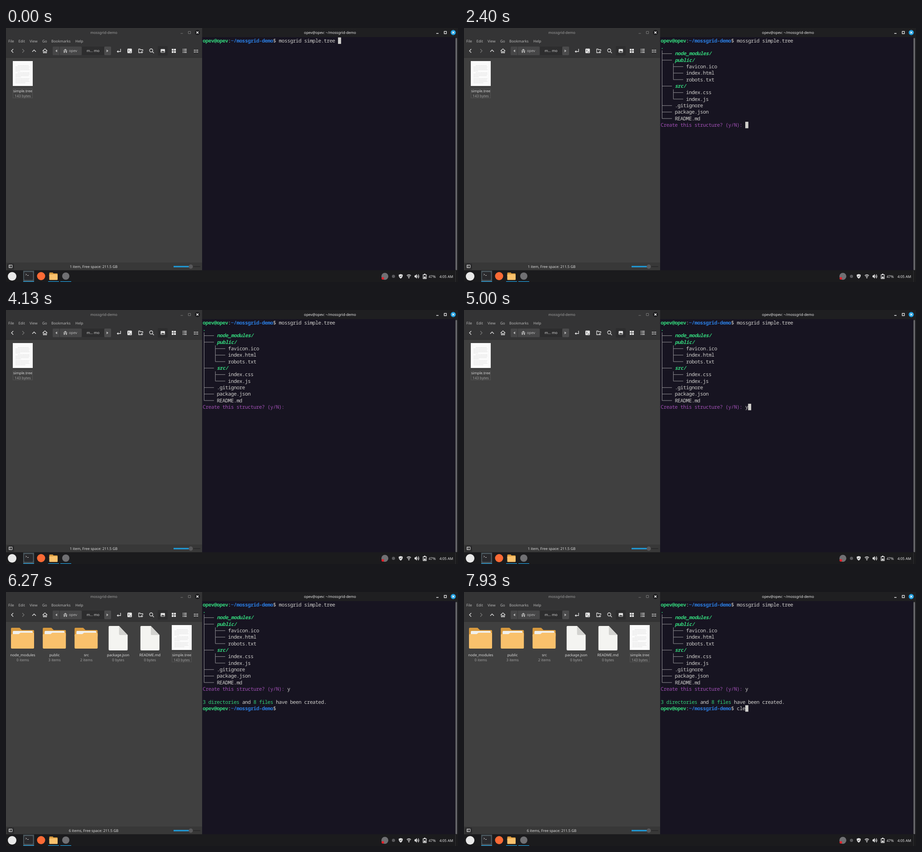
An HTML page that plays this animation: 998x561 px, repeating every 8000 ms.

```html
<!DOCTYPE html>
<html lang="en">
<head>
<meta charset="utf-8">
<title>Directory tree demo</title>
<style>
  html, body { margin: 0; width: 100%; height: 100%; overflow: hidden; background: #1b1b1d; }
  svg { display: block; width: 998px; height: 561px; }
  text { font: 8px "Noto Sans", "Open Sans", sans-serif; fill: #dcdcdc; text-rendering: geometricPrecision; }
  .mid { text-anchor: middle; }
  .dim { fill: #a0a0a0; }
  .soft { fill: #b8b8b8; }
  .strong { font-weight: 500; fill: #ececec; }
  /* 11.2px glyphs set on the terminal's 6.22px cell grid */
  #term text { font: 11.2px "Noto Sans Mono", "DejaVu Sans Mono", monospace; letter-spacing: -.498px; fill: #d0cfcc; white-space: pre; }
  #term .user { font-weight: 700; fill: #33d17a; }
  #term .path { font-weight: 700; fill: #2a7bde; }
  #term .dir { font-weight: 700; font-style: italic; fill: #33d17a; }
  #term .ok { fill: #33d17a; }
  #term .ask { fill: #a050b4; }
  .line { fill: none; stroke: #e4e4e4; stroke-width: 1.3; }
</style>
</head>
<body>
<svg viewBox="0 0 998 561">
  <defs>
    <g id="folder">
      <path d="M-26 81q0-2 2-2h17l5 5h25q2 0 2 2v12h-51z" fill="#d89a3f"/>
      <rect x="-22" y="86" width="44" height="14" rx="2" fill="#f1f0ec"/>
      <path d="M-26 95q0-2 2-2h15l4-3h28q2 0 2 2v31q0 2-2 2h-47q-2 0-2-2z" fill="#f9c16c"/>
    </g>
    <g id="page">
      <path d="M-21 77q0-2 2-2h21l19 20v32q0 2-2 2h-38q-2 0-2-2z" fill="#f4f4f1"/>
      <path d="M2 75l19 20h-17q-2 0-2-2z" fill="#d2d2cf"/>
    </g>
    <g id="sheet">
      <rect x="-22" y="73" width="44" height="55" fill="#fbfbfb"/>
      <path d="M-11 83h24M-16 86h31M-16 89h30M-16 92h31M-16 95h10M-11 99h26M-16 102h31M-16 105h29M-16 108h12M-16 112h31M-16 115h29M-16 118h31M-16 121h22" stroke="#cbcbcb" stroke-width=".7" stroke-dasharray="3 .7"/>
      <rect x="-21.5" y="134.5" width="43" height="20" fill="none" stroke="#777" stroke-width=".7" stroke-dasharray="1 1"/>
    </g>
    <path id="house" d="M-5 0L0-4.5 5 0M-3.5-1v5.3h2.5v-3h2v3h2.5V-1"/>
  </defs>

  <!-- file manager -->
  <rect width="433" height="535" fill="#404040"/>
  <rect width="433" height="65" fill="#343435"/>
  <rect y="64.5" width="433" height="1" fill="#2a2a2b"/>
  <text class="mid dim" x="216" y="13">mossgrid-demo</text>
  <path class="line" d="M385.500 12h5M402.500 7.500h5v5h-5z" style="stroke:#777;stroke-width:1"/>
  <circle cx="422.700" cy="10" r="5.700" fill="#1d1d1f"/>
  <path d="M420.400 7.700l4.600 4.600m0-4.600l-4.600 4.600" stroke="#f2f2f2" stroke-width="1.500"/>
  <g id="menu"></g>

  <rect x="103" y="41" width="64" height="19" rx="2" fill="#464647"/>
  <rect x="168" y="41" width="49" height="19" fill="#2d2d2e"/>
  <rect x="217" y="41" width="15" height="19" rx="2" fill="#4b4b4c"/>
  <path d="M118.500 41v19" stroke="#343435"/>
  <rect x="335" y="40" width="22" height="21" rx="2" fill="#2d2d2e"/>
  <path class="line" d="M16 46.500l-4 4 4 4M58 52.500l4-4 4 4"/>
  <path class="line" d="M36 46.500l4 4-4 4" style="stroke:#777"/>
  <use href="#house" x="86" y="50.500" class="line"/>
  <use href="#house" x="131" y="50.500" fill="#b8b8b8"/>
  <path d="M113 47.500v6l-4-3zM222 47.500v6l4-3z" fill="#b5b5b5"/>
  <text class="soft" x="139" y="53.300">opev</text>
  <text x="178" y="53.300">m... mo</text>
  <path class="line" d="M253 46v6h-7m2-2l-2.500 2 2.500 2"/>
  <rect x="268" y="45.500" width="10" height="10" rx="1.500" fill="#e4e4e4"/>
  <path d="M270 48l2 2-2 2M273.500 53h3" fill="none" stroke="#333"/>
  <path class="line" d="M298 54.500h-5v-8h3l1 1.500h5v3M300 51v5m-2.500-2.500h5"/>
  <circle class="line" cx="320.500" cy="49.500" r="3.500"/>
  <path class="line" d="M323 52l3.500 3.500"/>
  <rect x="341.500" y="46.500" width="9.500" height="8" rx="1" fill="#e4e4e4"/>
  <path d="M342.500 53.500l2.500-3.500 2 2 1.500-1.500 2 3z" fill="#333"/>
  <path d="M366 46h4v4h-4zm5 0h4v4h-4zm-5 5h4v4h-4zm5 0h4v4h-4z" fill="#e4e4e4"/>
  <path class="line" d="M390 47h2m1 0h6M390 50.500h2m1 0h6M390 54h2m1 0h6"/>
  <path d="M415 48h2v2h-2zm3.500 0h2v2h-2zm3.500 0h2v2h-2zm-7 4h2v2h-2zm3.500 0h2v2h-2zm3.500 0h2v2h-2z" fill="#e4e4e4"/>

  <g id="files"></g>

  <rect y="518" width="433" height="17" fill="#383838"/>
  <rect x="2" y="520" width="16" height="14" rx="2" fill="#2d2d2e"/>
  <path class="line" d="M6.500 523.500h7v6h-7zm2.500 0v6" style="stroke-width:1"/>
  <text id="status" class="mid" x="193.500" y="530"></text>
  <path d="M370 527h59" stroke="#2b2b2c" stroke-width="2"/>
  <path d="M370 527h35" stroke="#1f9ede" stroke-width="3"/>
  <circle cx="408" cy="527" r="4.700" fill="#58585a"/>

  <!-- terminal -->
  <rect x="433" width="565" height="535" fill="#171421"/>
  <rect x="433" width="565" height="20" fill="#1f1f21"/>
  <rect x="992" y="20" width="6" height="515" fill="#1f1f21"/>
  <rect x="992.500" y="22" width="3.500" height="513" rx="1.700" fill="#69696d"/>
  <text class="mid strong" x="715.500" y="13">opev@opev: ~/mossgrid-demo</text>
  <path class="line" d="M950 12h5M967.500 7.500h5v5h-5z"/>
  <circle cx="987.500" cy="10" r="5.700" fill="#1f9ede"/>
  <path d="M985.300 7.800l4.400 4.400m0-4.400l-4.400 4.400" stroke="#fff" stroke-width="1.300"/>
  <g id="term">
    <g id="first"></g>
    <g id="tree"></g>
    <g id="answer"></g>
    <g id="done"></g>
    <g id="typed"></g>
    <rect id="cursor" width="6.800" height="14.300" fill="#d0cfcc"/>
  </g>

  <!-- panel -->
  <rect y="535" width="998" height="26" fill="#1b1b1d"/>
  <circle cx="13.500" cy="548.500" r="9.500" fill="#e8e8e8"/>
  <rect x="38" y="536" width="24" height="25" fill="#48545a"/>
  <path d="M38 560.250h24M93 560.250h24M120 560.250h24" stroke="#1f8cc4" stroke-width="1.500"/>
  <rect x="40" y="539" width="19.500" height="17.500" rx="2" fill="#29292c"/>
  <path class="line" d="M43.500 543l2 1.500-2 1.500M47 546.500h3" style="stroke-width:.9"/>
  <circle cx="77.500" cy="548" r="9" fill="#fb6a35"/>
  <path d="M95.500 541.500q0-1.500 1.500-1.500h6l2 2h7.500q1.500 0 1.500 1.500v4h-18.500z" fill="#d89a3f"/>
  <rect x="95.500" y="544" width="18.500" height="12.500" rx="1.500" fill="#f9c16c"/>
  <circle cx="132" cy="548" r="8" fill="#707073"/>
  <circle cx="836.500" cy="548.500" r="7.700" fill="#707073"/>
  <circle cx="832" cy="553" r="2.800" fill="#e8202a"/>
  <circle cx="855.500" cy="548.500" r="3.500" fill="#59595c"/>
  <path d="M871.500 543.500l4.500 1.500q0 6-4.500 8.500-4.500-2.500-4.500-8.500z" fill="#e4e4e4"/>
  <path d="M869.500 548l1.500 1.800 2.700-3" fill="none" stroke="#1b1b1d"/>
  <path class="line" d="M885 547q4.500-4 9 0M886.800 549.200q2.700-2.300 5.400 0" style="stroke-width:1.400"/>
  <circle cx="889.500" cy="551.500" r="1.300" fill="#e4e4e4"/>
  <path d="M902 546.500h2l3-3v10l-3-3h-2z" fill="#e4e4e4"/>
  <path class="line" d="M908.500 546q2 2.500 0 5M910 544q3.500 4.500 0 9" style="stroke-width:1.100"/>
  <path class="line" d="M921 545h7v8.500h-7zM923 543.500h3"/>
  <rect x="922.500" y="549" width="4" height="3.500" fill="#e4e4e4"/>
  <text class="strong" x="933" y="551.500">47%</text>
  <text class="strong" x="957" y="551.500">4:05 AM</text>
  <path d="M992.500 536v25" stroke="#303033"/>
</svg>
<script>
const LEFT = 434.3, TOP = 20.8, CELL = 6.222, ROW = 14.33, LOOP = 8000, BLINK = 600;
const $ = id => document.getElementById(id);
const colX = col => LEFT + col * CELL;
const rowY = row => TOP + row * ROW;

const put = (col, row, str, cls = '') =>
  `<text x="${colX(col)}" y="${rowY(row) + 11}" class="${cls}">${str}</text>`;

const prompt = (row, cmd = '') =>
  put(0, row, 'opev@opev', 'user') + put(9, row, ':') +
  put(10, row, '~/mossgrid-demo', 'path') + put(25, row, '$') + put(27, row, cmd);

function drawTree() {
  const items = [
    [0, 'node_modules/'], [0, 'public/'], [1, 'favicon.ico'], [1, 'index.html'], [1, 'robots.txt'],
    [0, 'src/'], [1, 'index.css'], [1, 'index.js'], [0, '.gitignore'], [0, 'package.json'], [0, 'README.md']
  ];
  const mid = row => rowY(row) + 7.2;
  const trunk = (depth, from, to) => `M${colX(depth * 4 + .5)} ${rowY(from)}V${mid(to)}`;
  let lines = trunk(0, 2, 12) + trunk(1, 4, 6) + trunk(1, 8, 9);
  let names = put(0, 1, '.', 'user');
  items.forEach(([depth, name], i) => {
    const row = i + 2, col = depth * 4;
    lines += `M${colX(col + .5)} ${mid(row)}H${colX(col + 4)}`;
    names += put(col + 5, row, name, name.endsWith('/') ? 'dir' : '');
  });
  return `<path d="${lines}" fill="none" stroke="#a5a4a6" stroke-width=".9"/>` + names +
    put(0, 13, 'Create this structure? (y/N):', 'ask');
}

const file = ([icon, name, size], i) =>
  `<g transform="translate(${37 + i * 70.2})"><use href="#${icon}"/>` +
  `<text class="mid" y="142">${name}</text><text class="mid dim" y="153.300">${size}</text></g>`;

const sheet = ['sheet', 'simple.tree', '143 bytes'];
const before = [sheet].map(file).join('');
const after = [
  ['folder', 'node_modules', '0 items'], ['folder', 'public', '3 items'], ['folder', 'src', '2 items'],
  ['page', 'package.json', '0 bytes'], ['page', 'README.md', '0 bytes'], sheet
].map(file).join('');

$('menu').innerHTML = [[5, 'File'], [27.500, 'Edit'], [52, 'View'], [80, 'Go'], [100, 'Bookmarks'], [153, 'Help']]
  .map(([x, name]) => `<text class="soft" x="${x}" y="31.700">${name}</text>`).join('');
$('first').innerHTML = prompt(0, 'mossgrid simple.tree');
$('tree').innerHTML = drawTree();
$('answer').innerHTML = put(30, 13, 'y');
$('done').innerHTML = put(0, 15, '3 directories', 'ok') + put(14, 15, 'and') +
  put(18, 15, '8 files', 'ok') + put(26, 15, 'have been created.') + prompt(16);

// [time, column, row, start of blink]
const moves = [
  [0, 48, 0, 0], [2200, 0, 1, 2200], [2270, 30, 13, 2200], [4470, 31, 13, 4470],
  [5270, 0, 14, 5270], [5330, 27, 16, 5270],
  [7600, 28, 16, 7600], [7730, 29, 16, 7730], [7870, 30, 16, 7870]
];

const show = (id, on) => $(id).setAttribute('visibility', on ? 'visible' : 'hidden');
const last = {};
function fill(id, html) {
  if (last[id] !== html) $(id).innerHTML = last[id] = html;
}

function draw(now) {
  const t = now % LOOP;
  show('tree', t >= 2270);
  show('answer', t >= 4470);
  show('done', t >= 5330);
  fill('files', t < 5400 ? before : after);
  fill('status', `${t < 6270 ? '1 item' : '6 items'}, Free space: 211.5 GB`);

  const [, col, row, start] = moves.findLast(m => t >= m[0]);
  fill('typed', put(27, 16, 'cle'.slice(0, row === 16 ? col - 27 : 0)));
  $('cursor').setAttribute('x', colX(col) + .1);
  $('cursor').setAttribute('y', rowY(row));
  show('cursor', Math.floor((t - start) / BLINK) % 2 === 0);
}

function tick() {
  draw(performance.now());
  requestAnimationFrame(tick);
}
tick();
</script>
</body>
</html>
```
